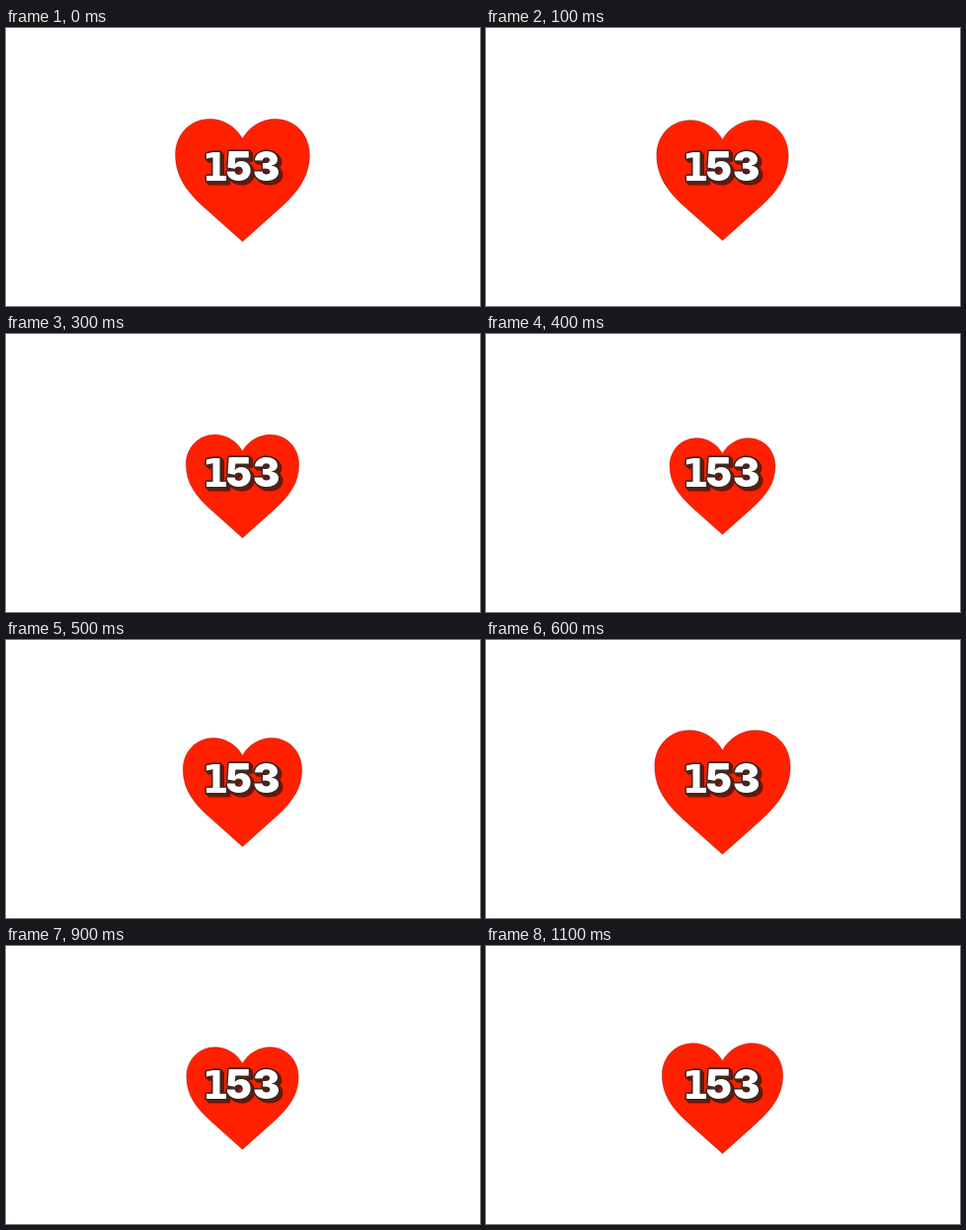
Animation of 480 by 282 pixels, one loop 1.2 s. Source, as an HTML page with a canvas:

```html
<!DOCTYPE html>
<html lang="en">
<head>
<meta charset="utf-8">
<title>Beating heart</title>
<style>
  html, body { margin: 0; width: 100%; height: 100%; overflow: hidden; background: #fff; }
  canvas { display: block; }
</style>
</head>
<body>
<canvas id="stage" width="480" height="282"></canvas>
<script>
const ctx = document.getElementById('stage').getContext('2d');
const STEP = 100;
// Heart width in px for each step of two beats
const widths = [136.5, 134, 126, 115, 107.5, 121, 138, 135, 126.5, 114, 109, 123];
const BASE = 137.5;

const heart = new Path2D(
  'M0-42.5C-7-55-20-62.5-33.5-62.5C-53-62.5-68.5-47-68.5-26' +
  'C-68.5-4-57 12-38 29L0 63L38 29C57 12 68.5-4 68.5-26' +
  'C68.5-47 53-62.5 33.5-62.5C20-62.5 7-55 0-42.5Z');

const digits = [
  ['1', 198.6, '700 39px "DejaVu Sans", sans-serif'],
  ['5', 222.5, '900 41px Inter, sans-serif'],
  ['3', 250, '900 41px Inter, sans-serif']
];

function drawDigits(method, color, offset = 0) {
  ctx[method + 'Style'] = color;
  for (const [char, x, font] of digits) {
    ctx.font = font;
    ctx[method + 'Text'](char, x + offset, 154.8 + offset);
  }
}

function drawHeart(scale) {
  ctx.save();
  ctx.translate(239.5, 154.3);
  ctx.scale(scale, scale);
  ctx.fillStyle = '#ff2000';
  ctx.fill(heart);
  ctx.lineWidth = 0.4;
  ctx.strokeStyle = 'rgba(70, 20, 10, 0.6)';
  ctx.stroke(heart);
  ctx.restore();
}

function draw(now) {
  const step = Math.floor(now / STEP) % widths.length;
  ctx.fillStyle = '#fff';
  ctx.fillRect(0, 0, 480, 282);
  drawHeart(widths[step] / BASE);

  ctx.lineJoin = 'round';
  ctx.lineWidth = 3;
  for (let depth = 3; depth > 0; depth -= 0.5) drawDigits('stroke', '#641a10', depth);
  drawDigits('stroke', '#3c2823');
  drawDigits('fill', '#fff');
}

const start = performance.now();
function tick() {
  draw(performance.now() - start);
  requestAnimationFrame(tick);
}
tick();
</script>
</body>
</html>
```
